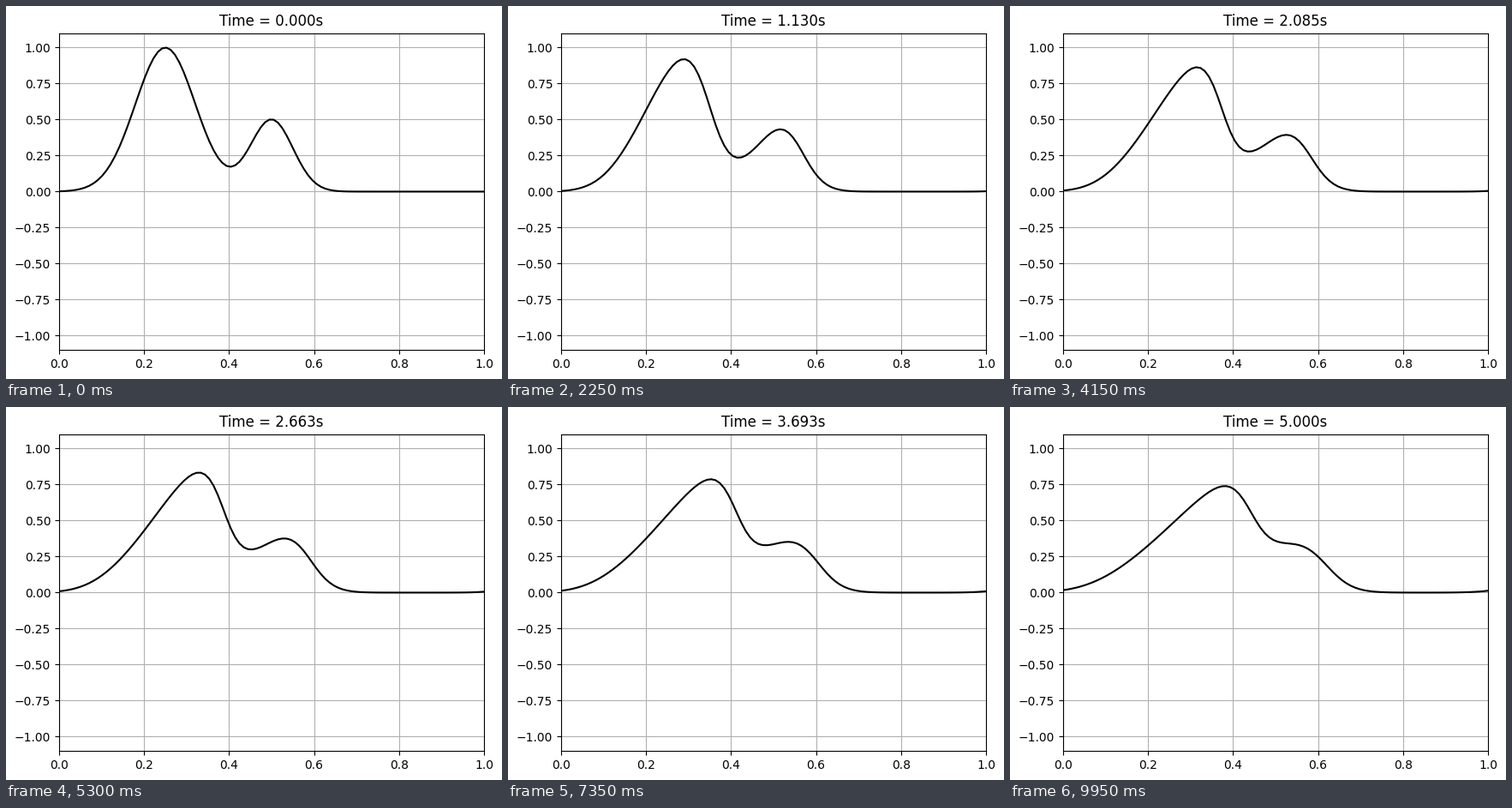
Write a matplotlib script that moves like this. It is 579 px wide and 435 px high and loops after 10 s.

```python
import numpy as np
import matplotlib.pyplot as plt
from matplotlib.animation import FuncAnimation

W, H, DPI = 579, 435, 100
FRAMES, INTERVAL = 200, 50
SPEED, VISCOSITY = 0.04, 0.0004

plt.rcParams["font.family"] = "DejaVu Sans"

x = np.linspace(0, 1, 100)
period = 1 + x[1]


def start(pos):
    return np.exp(-100 * (pos - 0.25) ** 2) + 0.5 * np.exp(-200 * (pos - 0.5) ** 2)


# Cole-Hopf solution of u_t + c u u_x = nu u_xx on a periodic line
STEP = 0.001
y = np.arange(-0.5, 1.5, STEP)
u0 = start(y % period)
total = np.cumsum(u0) * STEP - u0 * STEP / 2
theta = np.exp(-SPEED / (2 * VISCOSITY) * total)


def wave(t):
    if t == 0:
        return start(x)
    kernel = np.exp(-(x[:, None] - y) ** 2 / (4 * VISCOSITY * t))
    return kernel @ (u0 * theta) / (kernel @ theta)


# the tiny extra height guards against rounding down to 434 pixels
fig = plt.figure(figsize=(W / DPI, (H + 1e-6) / DPI), dpi=DPI, facecolor="white")
ax = fig.add_axes([62 / W, (H - 401.26) / H, 496 / W, 369.6 / H])
ax.set_xlim(0, 1)
ax.set_ylim(-1.1, 1.1)
ax.set_yticks(np.arange(-1, 1.01, 0.25))
ax.grid(True)
line, = ax.plot(x, start(x), color="black", lw=1.5)
title = ax.set_title("Time = 0.000s")


def update(i):
    t = 5000 * i // (FRAMES - 1) / 1000
    line.set_ydata(wave(t))
    title.set_text(f"Time = {t:.3f}s")
    return line, title


anim = FuncAnimation(fig, update, frames=FRAMES, interval=INTERVAL,
                     init_func=lambda: update(0), repeat=True, repeat_delay=0)
plt.show()
```
